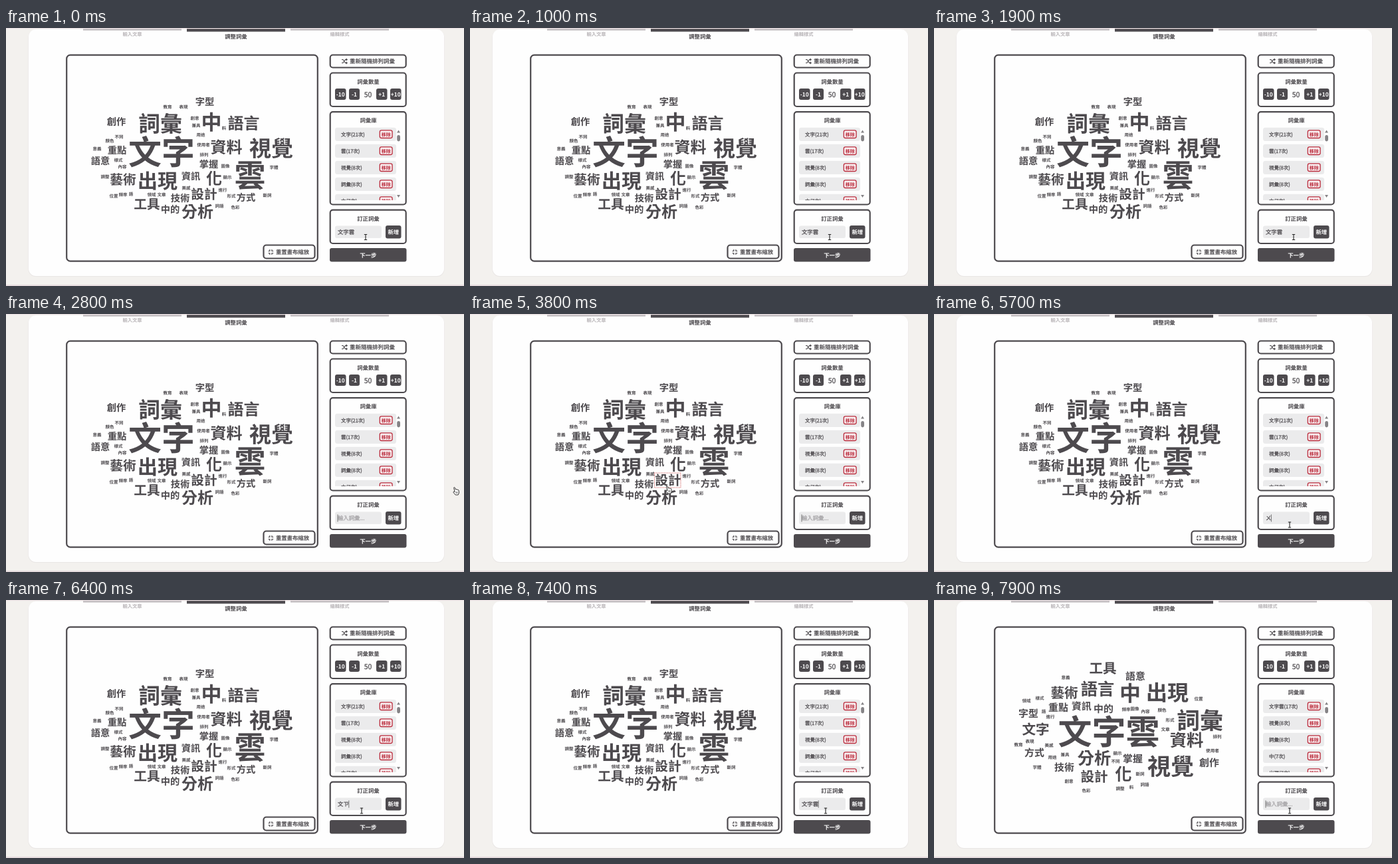
Recreate the animation shown at these times as an HTML page. Size 689x388 px, loop 8 s.

```html
<!DOCTYPE html>
<html lang="zh-Hant">
<head>
<meta charset="utf-8">
<title>文字雲</title>
<style>
html, body { margin: 0; width: 100%; height: 100%; overflow: hidden; background: #f3f1ee; }
svg { display: block; width: 689px; height: 388px; }
text { font-family: "Noto Sans CJK TC", "Noto Sans TC", "Noto Sans CJK JP", "Noto Sans CJK", sans-serif; white-space: pre; text-rendering: geometricPrecision; }
.medium { font-weight: 400; stroke: currentColor; stroke-width: .25px; }
</style>
</head>
<body>
<svg id="stage" viewBox="0 0 689 388"></svg>
<script>
const LOOP = 8000, CLEARED = 2300, SUBMITTED = 7600;
const INK = '#4d4a4e', FIELD = '#ebebec', RED = '#bb2f3f', FAINT = '#bab6b9';

// Words grouped by font size: "word x y" with the centre of each word
const cloudBefore = {
  50: '文字 234 187', 47: '雲 367 222', 33: '視覺 399 181,詞彙 232 143.6',
  31: '中 309 141.5', 30: '出現 228 230',
  24: '資料 331.6 179.5,語言 357.5 143.5,化 313 226,分析 288 276',
  19.7: '設計 298 249.6,工具 212 265,藝術 176 228',
  14.3: '字型 299 110,創作 166 140,重點 167 183,語意 142 199,掌握 305 204,資訊 278 222,技術 262 255,中的 247 272,方式 361 254',
  6.5: '教育 243 118,表現 267 118,創意 284 135,兼具 286 146,料 328 150,用途 293 160,使用者 297 175,' +
    '排列 298 190,圖像 330 207,顯示 333 224,字體 403 209,不同 170 163,顏色 156 169,意義 137 181,' +
    '樣式 169 198,內容 175 208,調整 149 223,美感 271 240,進行 326 243,位置 162 252,頻率 176 250,' +
    '語 188 249,領域 219 250,文章 234 250,形式 339 252,斷詞 393 251,詞語 321 267,色彩 345 269'
};
const cloudAfter = {
  51: '文字雲 263 199', 35: '詞彙 400 181,視覺 356 250', 32: '出現 351 139,中 295 140',
  25.3: '資料 380 211,語言 246 134,分析 241 238,化 285 262',
  20.6: '工具 254 102,藝術 196 139,設計 241 265,文字 153 194',
  14.9: '語意 303 114,字型 142 170,重點 187 161,資訊 222 159,中的 255 163,方式 151 229,技術 196 251,掌握 299 238,創作 414 244',
  6.6: '意義 198 116,位置 398 148,領域 139 151,樣式 159 147,語 165 167,進行 175 175,頻率 289 164,' +
    '圖像 302 163,內容 318 167,顏色 343 165,形式 355 180,文章 348 194,排列 426 205,使用者 419 226,' +
    '教育 127 217,表現 144 212,美感 173 218,用途 178 236,兼具 197 232,顯示 276 230,不同 273 242,' +
    '字體 155 251,斷詞 310 261,創意 203 272,色彩 229 286,調整 280 283,料 297 281,詞語 317 277'
};

const text = (s, x, y, size, { fill = INK, medium = false, anchor = 'middle', id = '' } = {}) =>
  `<text id="${id}" class="${medium ? 'medium' : ''}" x="${x}" y="${y + size * 0.347 + 0.55}" font-size="${size}" font-weight="700" fill="${fill}" color="${fill}" text-anchor="${anchor}">${s}</text>`;
const box = (x, y, w, h, r, fill, stroke = 'none', width = 0) =>
  `<rect x="${x}" y="${y}" width="${w}" height="${h}" rx="${r}" fill="${fill}" stroke="${stroke}" stroke-width="${width}"/>`;
const panel = (x, y, w, h, r = 4) => box(x, y, w, h, r, '#fefefe', INK, 2.2);
const button = (s, x, y, w, h) => box(x, y, w, h, 3, INK) + text(s, x + w / 2, y + h / 2, 8.4, { fill: '#fff' });
const line = (d, width = 1) => `<path d="${d}" fill="none" stroke="${INK}" stroke-width="${width}"/>`;
const group = (id, content) => `<g id="${id}">${content}</g>`;

const cloud = sizes => Object.entries(sizes).map(([size, words]) =>
  words.split(',').map(entry => {
    const [word, x, y] = entry.split(' ');
    return text(word, +x, +y, +size);
  }).join('')).join('');

const list = (items, firstAction) => items.map((item, i) => {
  const y = 159.7 + i * 25;
  return box(495, y - 10, 92, 20.3, 3.5, FIELD) +
    text(item, 504, y, 7.5, { medium: true, anchor: 'start' }) +
    box(562.3, y - 5.8, 18.8, 11.6, 2.5, '#f8ecee', RED, 1.3) +
    text(i ? '移除' : firstAction, 571.7, y, 7, { fill: RED });
}).join('');

const page =
  box(33.5, 2.5, 626, 371.5, 11, '#e9e6e5') + box(34, 2, 625, 371, 11, '#fefefe') +
  box(116, 0, 148, 3.7, 0, '#c3bec1') + box(272, 0, 148, 5.5, 0, INK) + box(428, 0, 148, 3.7, 0, '#c3bec1') +
  box(0, 0, 689, 1.2, 0, '#ece2e4') + box(0, 386, 689, 2, 0, '#e6dcde') +
  text('輸入文章', 190, 9, 7.3, { fill: FAINT }) +
  text('調整詞彙', 346, 12.7, 8.4) +
  text('編輯樣式', 502, 9, 7.3, { fill: FAINT }) +
  panel(91.2, 40.7, 377.6, 310, 5.5);

const resetButton = panel(387.5, 326.5, 77, 20) + text('重置畫布縮放', 431, 336.5, 8.4) +
  line('M394.5 335.5H396.8V333 M402.3 335.5H400V333 M394.5 338.5H396.8V341 M402.3 338.5H400V341', 1.2);

const sidebar =
  panel(487.7, 40.5, 114, 19) + text('重新隨機排列詞彙', 551, 49.8, 8.5) +
  line('M505 47.5H507L510.5 52.5H513 M505 52.5H507L510.5 47.5H513 M511.5 46L513.2 47.5L511.5 49 M511.5 51L513.2 52.5L511.5 54', 1.1) +
  panel(487.7, 67.5, 114, 50.5) + text('詞彙數量', 545, 80.7, 8.4) +
  button('-10', 495, 91, 16.5, 17) + button('-1', 516, 91, 16, 17) + text('50', 544.5, 99.5, 10.5, { medium: true }) +
  button('+1', 557, 91, 16.5, 17) + button('+10', 578, 91, 16.5, 17) +
  panel(487.7, 126.2, 114, 139.3) + text('詞彙庫', 545, 139, 8.4) +
  `<clipPath id="listArea"><rect x="494" y="148" width="94" height="111"/></clipPath>` +
  `<g clip-path="url(#listArea)">` +
  group('listBefore', list(['文字(21次)', '雲(17次)', '視覺(8次)', '詞彙(8次)', '中(7次)'], '移除')) +
  group('listAfter', list(['文字雲(17次)', '視覺(8次)', '詞彙(8次)', '中(7次)', '出現(7次)'], '刪除')) + '</g>' +
  `<path d="M588 157.5L590.5 153.5L593 157.5Z M588 251L590.5 255L593 251Z" fill="#858386"/>` +
  box(588.2, 161, 4.8, 9.5, 2.4, '#858386') +
  panel(487.7, 273.7, 114, 50.3) + text('訂正詞彙', 545, 287, 8.4) +
  box(495, 297.5, 70, 18.5, 3, FIELD) +
  text('', 499, 307, 8.4, { medium: true, anchor: 'start', id: 'field' }) +
  `<path id="caret" d="M0 301.5V312.5" stroke="#555" stroke-width=".8"/>` +
  button('新增', 571, 297, 23.5, 19.5) + button('下一步', 487, 331, 115.5, 20.5);

// Pointer shapes are drawn around their own centre
const pointers =
  group('beam', '<path d="M-2.2 -4H-.5L0 -3.5L.5 -4H2.2 M-2.2 4H-.5L0 3.5L.5 4H2.2 M0 -3.5V3.5" fill="none" stroke="#222" stroke-width="1.1"/>') +
  group('hand', '<path d="M-3.5 -5Q-2.5 -6 -1.8 -4.8L-.5 -1.8L0 -2.5L1.5 -1.8L2.8 -1.8L4 -.8L4.3 3L3 6H-1L-4 2.5Q-4.5 1 -3 1L-2 1.7Z" fill="#fff" stroke="#333" stroke-width="1"/><path d="M0 1V4 M1.8 1V4" stroke="#333" stroke-width=".7"/>') +
  group('move', '<path d="M0 -5L2 -2.6H.8V-.8H2.6V-2L5 0L2.6 2V.8H.8V2.6H2L0 5L-2 2.6H-.8V.8H-2.6V2L-5 0L-2.6 -2V-.8H-.8V-2.6H-2Z" fill="#6d3434" stroke="#e8d8d8" stroke-width=".5"/>');

const stage = document.getElementById('stage');
stage.innerHTML = page + group('cloudBefore', cloud(cloudBefore)) + group('cloudAfter', cloud(cloudAfter)) +
  group('hover', '<rect x="277.5" y="239" width="39.5" height="22" fill="none" stroke="#d45b5b" stroke-width="1" stroke-dasharray="1.2 1.2"/>') +
  resetButton + sidebar + group('pointer', pointers);

const $ = id => document.getElementById(id);
const show = (id, on) => $(id).setAttribute('display', on ? 'inline' : 'none');

// [time, x, y, shape]
const path = [
  [0, 541, 314.5, 'beam'], [CLEARED, 541, 314.5, 'beam'], [CLEARED, 682, 264, 'hand'], [2800, 678, 266, 'hand'],
  [3050, 470, 268, 'move'], [3600, 299, 264, 'hand'], [4500, 299, 264, 'move'],
  [4900, 476, 310, 'move'], [5000, 500, 313, 'beam'], [5300, 535, 317, 'beam'], [LOOP, 535, 317, 'beam']
];
const typing = [
  [0, '文字雲'], [CLEARED, ''], [5700, 'ㄨ'], [5850, 'ㄨㄣ'], [6050, '文'], [6300, '文ㄗ'], [6600, '文字'],
  [6800, '文字ㄩ'], [6950, '文字ㄩㄣ'], [7150, '文字雲'], [SUBMITTED, '']
];

function draw(t) {
  const done = t >= SUBMITTED;
  for (const name of ['cloud', 'list']) {
    show(name + 'Before', !done);
    show(name + 'After', done);
  }

  const i = path.findLastIndex(key => key[0] <= t);
  const [t0, x0, y0, shape] = path[i], [t1, x1, y1] = path[i + 1];
  const k = (t - t0) / (t1 - t0);
  $('pointer').setAttribute('transform', `translate(${x0 + (x1 - x0) * k} ${y0 + (y1 - y0) * k})`);
  for (const id of ['beam', 'hand', 'move']) show(id, id === shape);
  show('hover', t >= 3600 && t < 4500);

  const value = typing.findLast(step => step[0] <= t)[1];
  const field = $('field'), color = value ? INK : '#a5a3a6';
  field.textContent = value || '輸入詞彙...';
  field.setAttribute('fill', color);
  field.setAttribute('color', color);
  $('caret').setAttribute('transform', `translate(${499 + value.length * 8.4} 0)`);
  show('caret', t >= CLEARED);
}

const start = performance.now();
function tick() {
  draw((performance.now() - start) % LOOP);
  requestAnimationFrame(tick);
}
tick();
</script>
</body>
</html>
```
